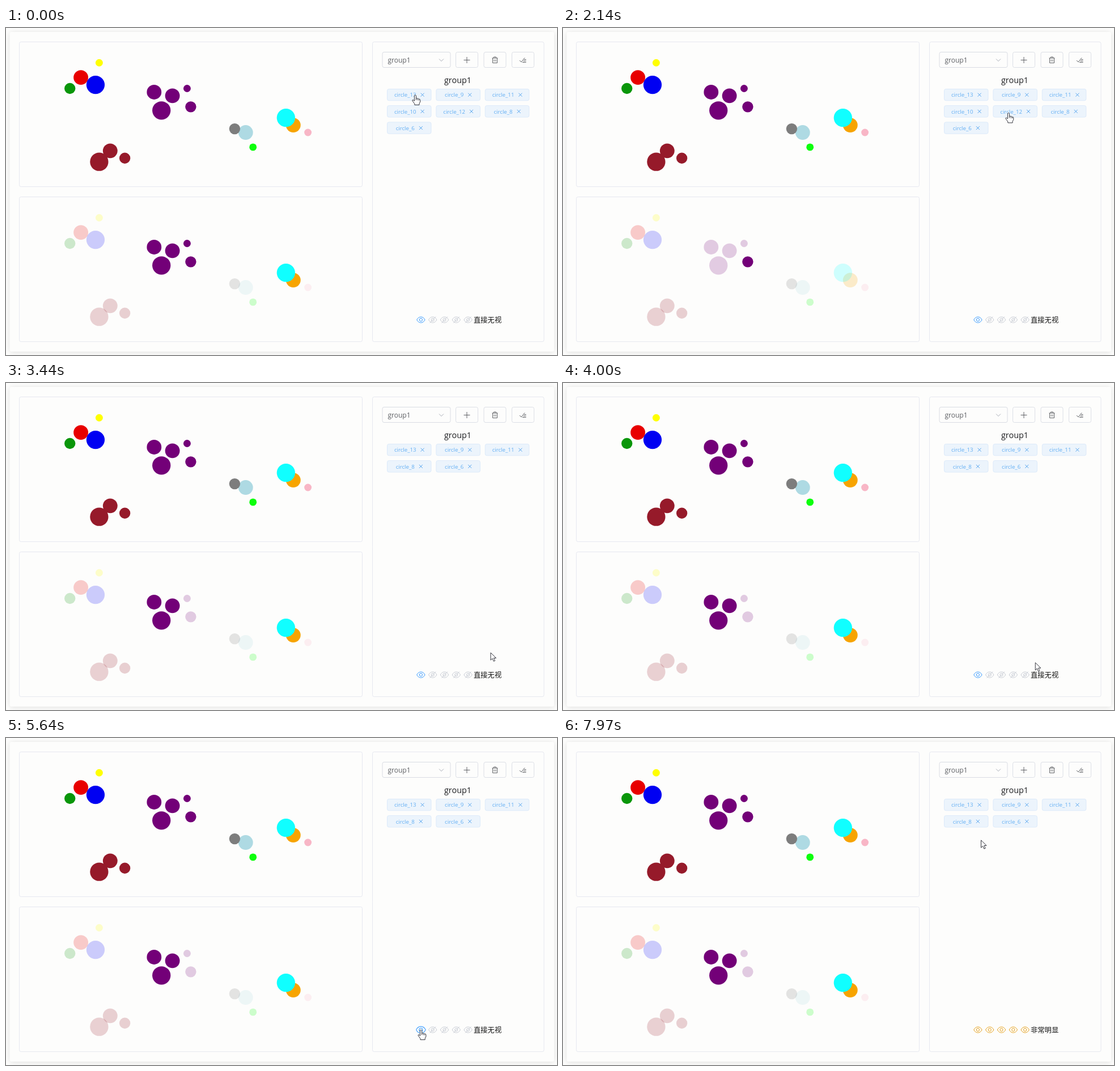
Animation of 972x576 px, one loop 8 s. Source, as an HTML page with a canvas:

```html
<!DOCTYPE html>
<html lang="zh">
<head>
<meta charset="utf-8">
<title>Groups</title>
<style>
  html, body { margin: 0; width: 100%; height: 100%; overflow: hidden; background: #fdfdfc; }
  canvas { display: block; width: 972px; height: 576px; }
</style>
</head>
<body>
<canvas id="stage" width="972" height="576"></canvas>
<script>
const ctx = document.getElementById('stage').getContext('2d');
const LOOP = 8000;
const SANS = '"Open Sans", "Noto Sans", sans-serif';
const CJK = '"Noto Sans CJK SC", "Noto Sans CJK", sans-serif';
const PAGE = '#fdfdfc', INK = '#606266', EDGE = '#e6e8f0';
const BLUE = '#409eff', GREEN = '#67c23a', ORANGE = '#e6a21f', PALE = '#c9cdd5';
const PURPLE = '#730078', BROWN = '#961a2a';

// Dots sit on a grid; the size is the diameter in cells.
const CELL = 6.46, GRID_X = 35.2, GRID_Y = 61.3, PANEL_STEP = 273;
const dot = (color, col, row, size, id) => ({
  color, id, x: GRID_X + col * CELL, y: GRID_Y + row * CELL, r: size * CELL / 2
});
const dots = [
  dot('#ffff00', 20, 0, 2), dot('#e80000', 15, 4, 4),
  dot('#0000f2', 19, 6, 5), dot('#0a960a', 12, 7, 3),
  dot(PURPLE, 35, 8, 4, 6), dot(PURPLE, 40, 9, 4, 8), dot(PURPLE, 37, 13, 5, 9),
  dot(PURPLE, 44, 7, 2, 10), dot(PURPLE, 45, 12, 3, 12),
  dot('#aedae3', 60, 19, 4), dot('#7d7d7d', 57, 18, 3), dot('#0cff0c', 62, 23, 2),
  dot('#f7a400', 73, 17, 4, 11), dot('#10ffff', 71, 15, 5, 13), dot('#f8b6c6', 77, 19, 2),
  dot(BROWN, 23, 24, 4), dot(BROWN, 20, 27, 5), dot(BROWN, 27, 26, 3)
];

const tagOrder = [13, 9, 11, 10, 12, 8, 6];
const removedAt = { 10: 2550, 12: 2740 };
const isGone = (id, t) => t >= removedAt[id];
const TAG_W = 77.5, TAG_H = 20.3;
const tagSlot = i => ({ x: 672.5 + i % 3 * 86.4, y: 107.5 + Math.floor(i / 3) * 29.2 });

const EYES_X = 721.5, EYE_W = 20.8, EYE_Y = 514, RATED_AT = 7200;
const eyeX = n => EYES_X + (n - 0.5) * EYE_W;
const labels = ['', '直接无视', '不太明显', '一般明显', '有点明显', '非常明显'];

// Where the pointer rests; a tag gains focus after a short delay.
const FOCUS_DELAY = 200;
const stop = (from, to, x, y, focus) => ({ from, to, x, y, focus });
const stops = [
  stop(0, 240, 722, 118),
  stop(1040, 1500, 708, 140, 10),
  stop(1900, 2220, 786, 149.5, 12),
  stop(2500, 2780, 734, 146),
  stop(3400, 3600, 855, 475),
  stop(4500, 4700, 803, 517),
  stop(5600, 5600, eyeX(1), EYE_Y),
  stop(6650, 6780, eyeX(4) - 2, EYE_Y),
  stop(7050, 7360, eyeX(5), EYE_Y),
  stop(7900, LOOP, 737.5, 180)
];

function pointerAt(t) {
  const i = stops.findIndex(s => t <= s.to), b = stops[i];
  if (t >= b.from) return b;
  const a = stops[i - 1], u = (t - a.to) / (b.from - a.to), e = u * u * (3 - 2 * u);
  return { x: a.x + (b.x - a.x) * e, y: a.y + (b.y - a.y) * e };
}

function focusAt(t) {
  const s = t - FOCUS_DELAY;
  return stops.find(p => p.focus && s >= p.from && s < p.to)?.focus;
}

function box(x, y, w, h, fill, stroke) {
  ctx.beginPath();
  ctx.roundRect(x, y, w, h, 3);
  if (fill) { ctx.fillStyle = fill; ctx.fill(); }
  if (stroke) { ctx.strokeStyle = stroke; ctx.lineWidth = 1; ctx.stroke(); }
}

function trace(path, x, y, color, fill) {
  ctx.save();
  ctx.translate(x, y);
  if (fill) { ctx.fillStyle = fill; ctx.fill(path); }
  ctx.strokeStyle = color;
  ctx.lineWidth = 1;
  ctx.lineJoin = 'round';
  ctx.stroke(path);
  ctx.restore();
}

function text(str, x, y, size, color, family = SANS, align = 'left') {
  ctx.font = `${size}px ${family}`;
  ctx.textAlign = align;
  ctx.fillStyle = color;
  ctx.fillText(str, x, y);
}

const chevron = new Path2D('M-4-2L0 2L4-2');
const cross = new Path2D('M-3-3L3 3M3-3L-3 3');
const plus = new Path2D('M-5.5 0H5.5M0-5.5V5.5');
const bin = new Path2D('M-5-3.5H5M-2-3.5V-5.5H2V-3.5M-4-3.5V5H4V-3.5M-1.4-1V2.5M1.4-1V2.5');
const check = new Path2D('M-6 .5L-3 3.5L3-4M2-1H5.5M.5 1.5H5.5M-1 4H5.5');
const arrow = new Path2D('M0 0V13.2L3.1 10.3L5.3 15.2L7.6 14.2L5.4 9.5H9.6Z');
const hand = new Path2D('M-1.6 1Q0-1.2 1.4 1V6Q3 5 4.1 6.4Q5.7 5.7 6.6 7.2Q8.5 6.9 8.7 8.6' +
  'V12L7 15V17.5H-1.2V15.5L-5.2 10Q-5.3 8-3.2 8.9L-1.6 10.5ZM1.4 6V9M4.1 6.8V9.4M6.5 7.6V9.6');
const eyeShape = new Path2D('M-7.2 0C-4-6.8 4-6.8 7.2 0C4 6.8-4 6.8-7.2 0' +
  'M2.6 0A2.6 2.6 0 1 1-2.6 0A2.6 2.6 0 1 1 2.6 0');
const slash = new Path2D('M-5 5.5L5.5-5.5');

function drawFrame() {
  ctx.fillStyle = PAGE;
  ctx.fillRect(0, 0, 972, 576);
  ctx.save();
  ctx.shadowColor = 'rgba(0,0,0,.12)';
  ctx.shadowBlur = 10;
  ctx.shadowOffsetY = 1;
  box(6.5, 7, 960.5, 563, PAGE);
  ctx.restore();
  for (const y of [24.5, 24.5 + PANEL_STEP]) box(23.5, y, 605, 255, null, EDGE);
  box(646.5, 24.5, 302.5, 528, null, EDGE);
}

function drawDots(dy, isLit) {
  for (const d of dots) {
    ctx.globalAlpha = isLit(d.id) ? 1 : 0.2;
    ctx.beginPath();
    ctx.arc(d.x, d.y + dy, d.r, 0, Math.PI * 2);
    ctx.fillStyle = d.color;
    ctx.fill();
  }
  ctx.globalAlpha = 1;
}

function drawToolbar() {
  box(664, 42.5, 120, 27, null, '#d9dce3');
  text('group1', 673.5, 61, 12, INK);
  trace(chevron, 768, 56.5, '#a9adb6');
  [plus, bin, check].forEach((icon, i) => {
    const x = 793.5 + i * 49.5;
    box(x, 42.5, 39, 27, null, '#dcdfe6');
    trace(icon, x + 19.5, 56.5, INK);
  });
  text('group1', 797, 97, 14.4, '#1c1d20', SANS, 'center');
}

function drawTags(ids) {
  ids.forEach((id, i) => {
    const { x, y } = tagSlot(i), name = 'circle_' + id;
    box(x, y, TAG_W, TAG_H, '#ecf4fc', '#dceafa');
    ctx.font = `9.7px ${SANS}`;
    const w = ctx.measureText(name).width, left = x + (TAG_W - w - 14) / 2;
    text(name, left, y + 13.8, 9.7, '#62aef3');
    trace(cross, left + w + 11, y + 10.2, '#55a5ef');
  });
}

function drawRating(value, hovered) {
  const color = value <= 2 ? BLUE : value >= 4 ? ORANGE : GREEN;
  for (let n = 1; n <= 5; n++) {
    const part = value - n + 1;
    ctx.save();
    ctx.translate(eyeX(n), EYE_Y);
    if (hovered && Math.ceil(value) === n) ctx.scale(1.15, 1.15);
    if (part < 1) {
      trace(eyeShape, 0, 0, PALE);
      trace(slash, 0, 0, PALE);
    }
    if (part > 0) {
      ctx.beginPath();
      ctx.rect(-9, -8, part < 1 ? 9 : 18, 16);
      ctx.clip();
      ctx.fillStyle = PAGE;
      ctx.fill();
      trace(eyeShape, 0, 0, color);
    }
    ctx.restore();
  }
  text(labels[Math.ceil(value)], 825, 518.7, 12.3, '#111', CJK);
}

function draw(t) {
  const p = pointerAt(t), focus = focusAt(t);
  const ids = tagOrder.filter(id => !isGone(id, t));
  const within = (x, y, w, h) => p.x >= x && p.x <= x + w && p.y >= y && p.y <= y + h;
  const onEyes = within(EYES_X, EYE_Y - 9, EYE_W * 5, 18);
  const onTag = ids.some((id, i) => within(tagSlot(i).x, tagSlot(i).y, TAG_W, TAG_H));
  const saved = t < RATED_AT ? 1 : 5;
  const value = onEyes ? Math.ceil((p.x - EYES_X) / EYE_W * 2) / 2 : saved;

  drawFrame();
  drawDots(0, () => true);
  drawDots(PANEL_STEP, id => focus ? id === focus : ids.includes(id));
  drawToolbar();
  drawTags(ids);
  drawRating(value, onEyes);
  trace(onEyes || onTag ? hand : arrow, p.x, p.y, '#33343c', '#fff');
}

function tick() {
  draw(performance.now() % LOOP);
  requestAnimationFrame(tick);
}
tick();
</script>
</body>
</html>
```
